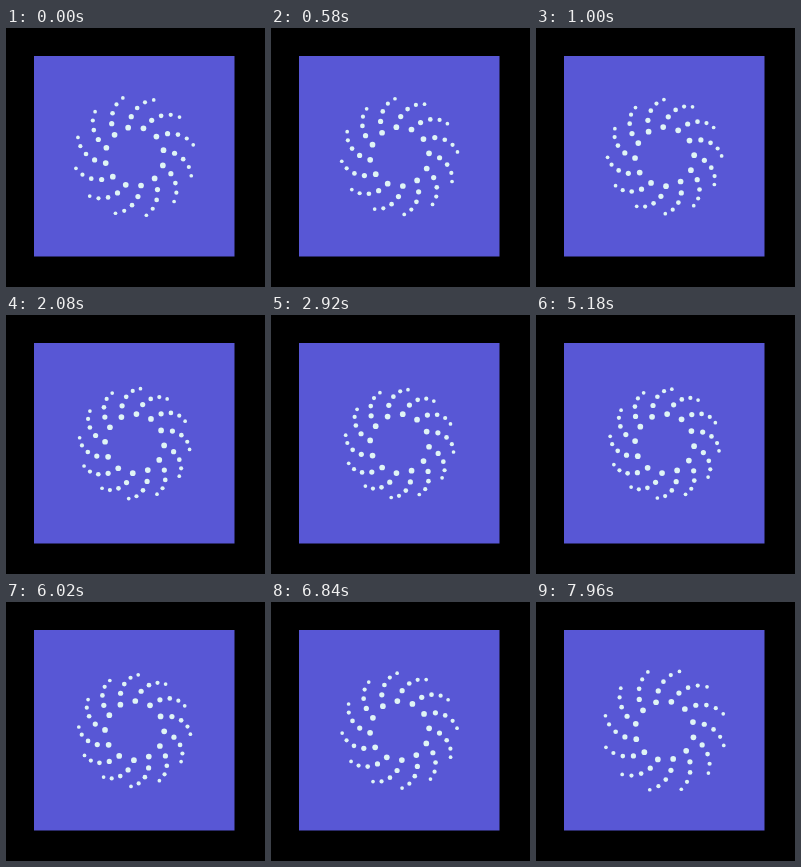
These frames come from a looping animation (259 px wide and 259 px high, 8000 ms). An HTML page with a canvas:

```html
<!DOCTYPE html>
<html lang="en">
<head>
<meta charset="utf-8">
<title>Spiral dots</title>
<style>
  html, body { margin: 0; width: 100%; height: 100%; overflow: hidden; background: #000; }
  canvas { display: block; }
</style>
</head>
<body>
<canvas id="stage" width="259" height="259"></canvas>
<script>
const ctx = document.getElementById('stage').getContext('2d');
const LOOP = 8000, TURNING_POINT = 3.82;
const ARMS = 12, DOTS = 5, CENTER = 128.6;

function draw(ms) {
  // Degrees the spiral is wound back from its turning point.
  const tau = ms / 1000 - TURNING_POINT;
  const unwind = 1.08 * tau ** 2 + 0.018 * tau ** 4;
  const step = 8.2 - 0.02 * unwind;

  ctx.fillStyle = '#000';
  ctx.fillRect(0, 0, 259, 259);
  ctx.fillStyle = '#5857d5';
  ctx.fillRect(28, 28, 200.5, 200.5);

  ctx.fillStyle = '#dff4f5';
  for (let arm = 0; arm < ARMS; arm++) {
    for (let i = 0; i < DOTS; i++) {
      const angle = (arm * 360 / ARMS + 7 - unwind + i * step) * Math.PI / 180;
      const radius = 29.6 + 11.5 * i + (0.0175 * unwind - 1.33) * i * i;
      ctx.beginPath();
      ctx.arc(CENTER + radius * Math.sin(angle), CENTER - radius * Math.cos(angle),
        2.85 - 0.25 * i, 0, 2 * Math.PI);
      ctx.fill();
    }
  }
}

const start = performance.now();
function frame() {
  draw((performance.now() - start) % LOOP);
  requestAnimationFrame(frame);
}
frame();
</script>
</body>
</html>
```
